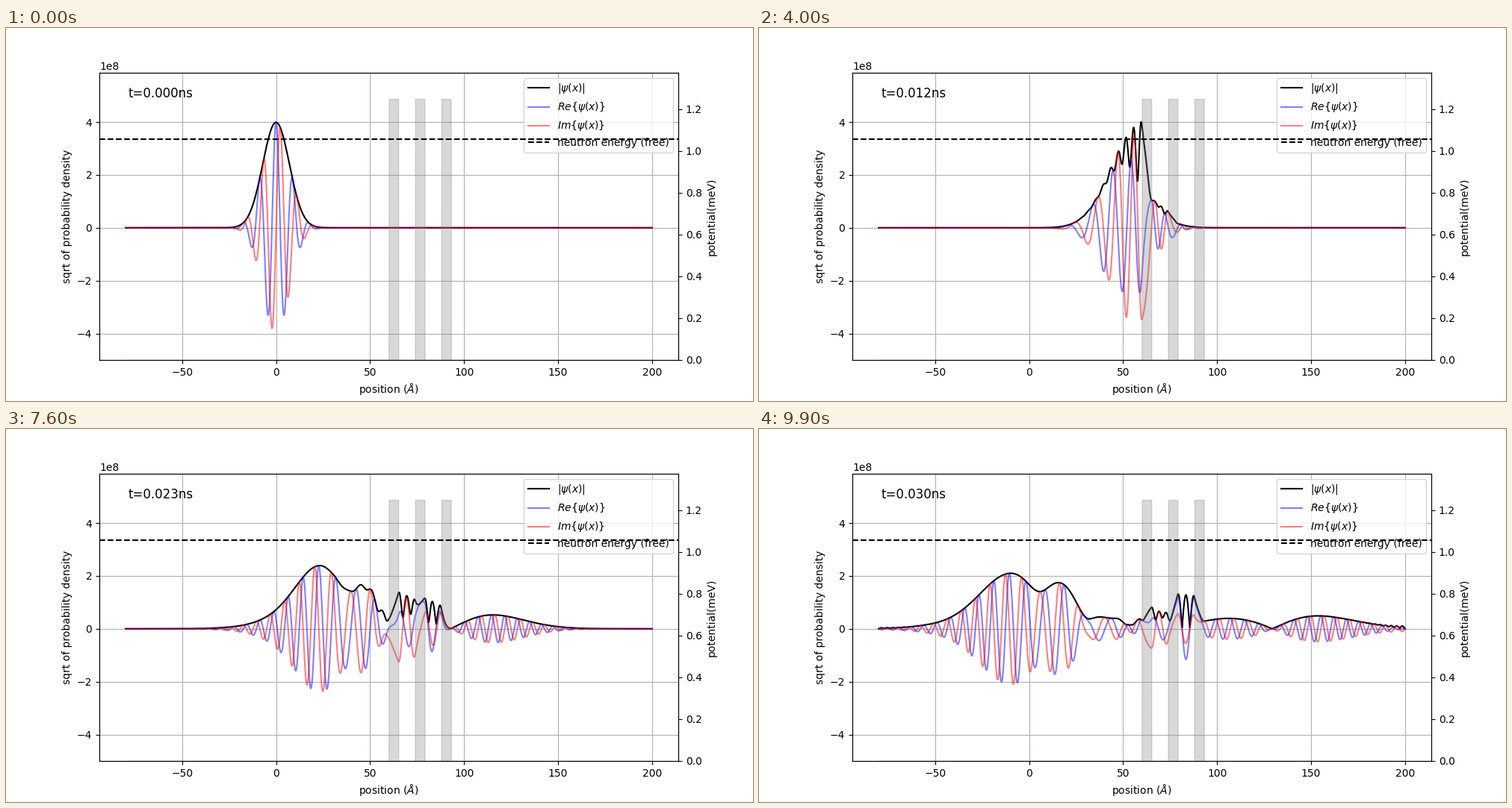
A matplotlib script for the animation above (10000 ms loop, 1000 by 500 pixels).

```python
import numpy as np
import matplotlib.pyplot as plt
from matplotlib.animation import FuncAnimation

# Units: angstrom, picosecond, meV
HBAR = 0.658212
KINETIC = 2.07212            # hbar^2 / 2m of the neutron
WAVELENGTH = 8.8
K0 = 2 * np.pi / WAVELENGTH
WIDTH = 10.0
HEIGHT = 1.25
BARRIERS = [(60, 65), (74, 79), (88, 93)]
X0, X1 = -80.0, 200.0
STEP = 0.3                   # simulated time per frame
FRAMES = 100
MODES = 400


def cos_integral(k, a, b):
    """Integral of cos(k u) from a to b, also for k = 0."""
    return b * np.sinc(k * b / np.pi) - a * np.sinc(k * a / np.pi)


def solve(x):
    """Energies, eigenstates on x and starting weights for the walled box."""
    length = X1 - X0
    k = np.arange(1, MODES + 1) * np.pi / length
    diff, total = k[:, None] - k, k[:, None] + k
    ham = np.diag(KINETIC * k**2)
    for a, b in BARRIERS:
        a, b = a - X0, b - X0
        ham += HEIGHT / length * (cos_integral(diff, a, b)
                                  - cos_integral(total, a, b))
    energy, vectors = np.linalg.eigh(ham)
    states = np.sqrt(2 / length) * np.sin(np.outer(x - X0, k)) @ vectors
    amp = 1e10 / (WIDTH * np.sqrt(2 * np.pi))
    packet = amp * np.exp(-(x / WIDTH)**2 + 1j * K0 * x)
    weights = states.T @ packet * (x[1] - x[0])
    return energy, states, weights


x = np.linspace(X0, X1, 2801)
energy, states, weights = solve(x)


def psi(t):
    return states @ (weights * np.exp(-1j * energy * t / HBAR))


fig, ax = plt.subplots(figsize=(10, 5), dpi=100)
mod, = ax.plot(x, 0 * x, "k", label=r"$|\psi(x)|$")
real, = ax.plot(x, 0 * x, "b", alpha=0.5, label=r"$Re\{\psi(x)\}$")
imag, = ax.plot(x, 0 * x, "r", alpha=0.5, label=r"$Im\{\psi(x)\}$")
clock = ax.text(0.05, 0.95, "", transform=ax.transAxes, va="top", fontsize=12)
ax.set_xlim(-94, 214)
ax.set_ylim(-5e8, 5.865e8)
ax.set_xlabel(r"position ($\AA$)")
ax.set_ylabel("sqrt of probability density")
ax.grid()

pot = ax.twinx()
potential = sum(HEIGHT * ((x >= a) & (x <= b)) for a, b in BARRIERS)
pot.fill_between(x, potential, color="gray", alpha=0.3)
free = pot.axhline(KINETIC * K0**2, color="k", ls="--",
                   label="neutron energy (free)")
pot.set_ylim(0, 1.1 * HEIGHT)
pot.set_ylabel("potential(meV)")
ax.legend(handles=[mod, real, imag, free], loc="upper right")


def update(i):
    t = i * STEP
    wave = psi(t)
    mod.set_ydata(np.abs(wave))
    real.set_ydata(wave.real)
    imag.set_ydata(wave.imag)
    clock.set_text(f"t={t / 1000:.3f}ns")
    return mod, real, imag, clock


anim = FuncAnimation(fig, update, frames=FRAMES, interval=100,
                     repeat=True, repeat_delay=0, blit=False)
plt.show()
```
